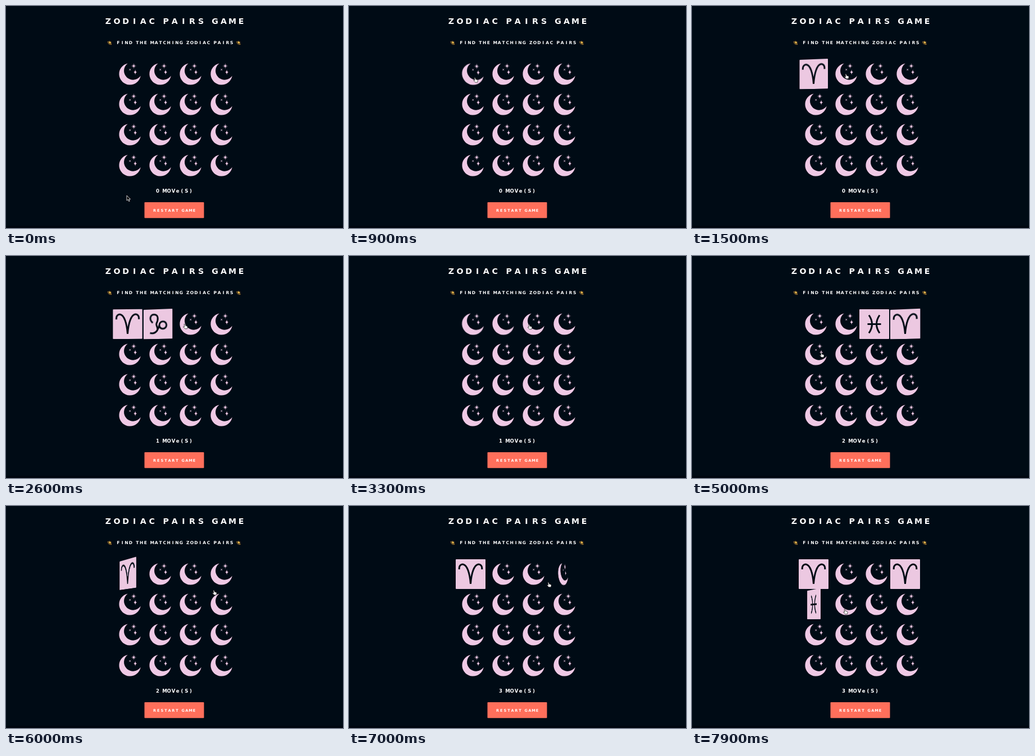
Write an HTML page that moves like this. It is 600 by 396 pixels and loops after 8 s.

```html
<!DOCTYPE html>
<html lang="en">
<head>
<meta charset="utf-8">
<title>Zodiac Pairs Game</title>
<style>
  html, body { margin: 0; width: 100%; height: 100%; overflow: hidden; background: #000b15; }
  #stage { position: relative; width: 600px; height: 396px; overflow: hidden; background: #000b15; }
  #page, #cursor { position: absolute; left: 0; top: 0; }
  #page text {
    fill: #fff; text-anchor: middle;
    font-family: "DejaVu Sans", sans-serif; font-weight: bold;
  }
  #board {
    position: absolute; left: 189.5px; top: 94.5px; width: 217px; height: 217px;
    perspective: 500px;
  }
  .card { position: absolute; width: 53px; height: 53px; transform-style: preserve-3d; }
  .side { position: absolute; left: 0; top: 0; overflow: visible; backface-visibility: hidden; }
  .face { background: #ecc8e1; border-radius: 1px; transform: rotateY(180deg); }
  .face path { fill: none; stroke: #000b15; stroke-width: 3; }
  .back { fill: #efc9e5; }
  #cursor { overflow: visible; }
</style>
</head>
<body>
<div id="stage">
  <svg id="page" width="600" height="396">
    <defs>
      <g id="dizzy">
        <path d="M-3.5 -2.5C-4.5 1 -1 4 3 3M-1.5 -3C-2 0 0 2 3 1.5" fill="none" stroke="#b98632" stroke-width="1"/>
        <path d="M0 -3.5L.8 -1.6L3 -1.4L1.4 .1L1.8 2L0 1L-1.8 2L-1.4 .1L-3 -1.4L-.8 -1.6Z" fill="#e7b44b"/>
      </g>
    </defs>
    <rect y="392" width="600" height="4" fill="#00060f"/>
    <use href="#dizzy" x="185" y="65.5"/>
    <use href="#dizzy" x="414.5" y="65.5"/>
    <rect x="246.5" y="350" width="106" height="28.3" rx="1" fill="#ff6f5b"/>
  </svg>
  <div id="board"></div>
  <svg id="cursor" width="12" height="14">
    <path id="arrow" d="M0 0V9L2.2 7.2L3.8 10.6L5.2 10L3.7 6.7H6.5Z" fill="#000" stroke="#fff" stroke-width=".8"/>
    <path id="hand" d="M0 .6Q.9 -.5 1.6 .8L2.5 3.3L5.3 4Q6.3 4.4 6.1 6L5.5 8.8H1.8L-1.3 5.8Q-1.6 4.6 -.3 4.9L.8 5.4Z" fill="#fff" stroke="#111" stroke-width=".7"/>
  </svg>
</div>
<script>
const LOOP = 8000, FLIP = 1000, PITCH = 54.4;
const page = document.getElementById('page');
const board = document.getElementById('board');
const cursor = document.getElementById('cursor');
const arrow = document.getElementById('arrow');
const hand = document.getElementById('hand');

const clamp = value => Math.min(1, Math.max(0, value));
const mix = (from, to, amount) => from + (to - from) * amount;
const smooth = value => value * value * (3 - 2 * value);

// The CSS "ease" curve, solved by bisection.
function ease(progress) {
  if (progress <= 0 || progress >= 1) return clamp(progress);
  const bezier = (s, a, b) => 3 * s * (1 - s) ** 2 * a + 3 * s * s * (1 - s) * b + s ** 3;
  let low = 0, high = 1;
  for (let i = 0; i < 20; i++) {
    const middle = (low + high) / 2;
    if (bezier(middle, .25, .25) < progress) low = middle; else high = middle;
  }
  return bezier(low, .1, 1);
}

// Fixed-pitch lettering; a word space is narrower than a letter.
function addText(string, x, y, size, pitch) {
  const text = document.createElementNS('http://www.w3.org/2000/svg', 'text');
  const stops = [];
  for (const char of string) {
    stops.push(x.toFixed(2));
    x += char === ' ' ? pitch * .61 : pitch;
  }
  text.setAttribute('x', stops.join(' '));
  text.setAttribute('y', y);
  text.setAttribute('font-size', size);
  text.textContent = string;
  page.append(text);
  return text;
}

addText('ZODIAC PAIRS GAME', 182, 32, 14.2, 15.55);
addText('FIND THE MATCHING ZODIAC PAIRS', 199.8, 68, 7.6, 7.36);
addText('RESTART GAME', 264.5, 367, 6.6, 6.65);
const counter = addText('0 MOVe(S)', 270, 332.5, 8.6, 7.75);

function star(cx, cy, points, radii, turn = 0) {
  const count = points * 2;
  const corners = Array.from({ length: count }, (_, i) => {
    const angle = turn + i * 2 * Math.PI / count - Math.PI / 2;
    const r = radii[i % radii.length];
    return `${(cx + r * Math.cos(angle)).toFixed(2)} ${(cy + r * Math.sin(angle)).toFixed(2)}`;
  });
  return `M${corners.join('L')}Z`;
}

const moon = 'M-4 -18.9A19.3 19.3 0 1 0 19 3.2A16.2 16.2 0 1 1 -4 -18.9Z'
  + star(6.7, -14.3, 8, [5.2, 1.3, 4, 1.3])
  + star(0, -7.8, 4, [2.8, .6], Math.PI / 4)
  + 'M9.4 -8Q9.8 -3.6 12.4 -3.2Q9.8 -2.8 9.4 1.6Q9 -2.8 6.4 -3.2Q9 -3.6 9.4 -8Z';

const signs = {
  aries: 'M6.2 18C5.7 10.5 10 8.6 13.6 9.2C20 10.5 25 24 26.5 44C28 24 33 10.5 39.4 9.2C43 8.6 47.3 10.5 46.8 18',
  capricorn: 'M17 24C9 17 13 8.5 20 9.2C28 10 27 19 24 25C22 29 28 33 25 38C22 42 17 43.5 12 42M42 28.5A6.5 6.5 0 1 1 29 28.5A6.5 6.5 0 1 1 42 28.5M29 28.5Q28 33 25 38',
  pisces: 'M17 10.5Q28 26.5 17 42.5M36 10.5Q25 26.5 36 42.5M14.5 26.5H38.5'
};

// Per card: its sign and the times at which it turns over and back.
const plays = [
  ['aries', 800, 2570, 5560],
  ['capricorn', 1860, 2570],
  ['pisces', 3350, 5010],
  ['aries', 4310, 5010, 6800],
  ['pisces', 7490]
];
const moves = [1860, 4310, 6800];

// Pointer stops: time, x, y.
const path = [
  [0, 215, 338], [250, 215, 338], [650, 222, 128], [1100, 224, 127],
  [1450, 273, 121], [2100, 274, 121], [2550, 317, 121], [3500, 320, 122],
  [4050, 378, 128], [4550, 378, 128], [5000, 229, 172], [5350, 222, 130],
  [5650, 224, 130], [6000, 369, 150], [6350, 379, 128], [6900, 379, 128],
  [7300, 222, 178], [7560, 223, 178], [7900, 271, 184]
];

const cards = Array.from({ length: 16 }, (_, i) => {
  const [sign, ...turns] = plays[i] || [];
  const element = document.createElement('div');
  element.className = 'card';
  element.style.left = i % 4 * PITCH + 'px';
  element.style.top = Math.floor(i / 4) * PITCH + 'px';
  element.innerHTML = `<svg class="side back" width="53" height="53"><path transform="translate(30.7 26.3)" d="${moon}"/></svg>`;
  if (sign) {
    element.innerHTML += `<svg class="side face" width="53" height="53"><path d="${signs[sign]}"/></svg>`;
  }
  board.append(element);
  return { element, turns };
});

// Each turn starts from wherever the one before has got to.
function cardAngle(turns, time) {
  return turns.reduce((angle, start, i) =>
    mix(angle, i % 2 ? 0 : 180, ease((time - start) / FLIP)), 0);
}

function pointerAt(time) {
  const next = path.findIndex(stop => stop[0] > time);
  if (next < 0) return path.at(-1).slice(1);
  const [t0, x0, y0] = path[next - 1];
  const [t1, x1, y1] = path[next];
  const amount = smooth((time - t0) / (t1 - t0));
  return [mix(x0, x1, amount), mix(y0, y1, amount)];
}

function draw(time) {
  for (const { element, turns } of cards) {
    element.style.transform = `rotateY(${cardAngle(turns, time)}deg)`;
  }
  const [x, y] = pointerAt(time);
  const overCards = y < 311;
  cursor.style.transform = `translate(${x}px, ${y}px)`;
  arrow.style.display = overCards ? 'none' : '';
  hand.style.display = overCards ? '' : 'none';
  counter.textContent = `${moves.filter(move => time >= move).length} MOVe(S)`;
}

const start = performance.now();
function tick() {
  draw((performance.now() - start) % LOOP);
  requestAnimationFrame(tick);
}
tick();
</script>
</body>
</html>
```
